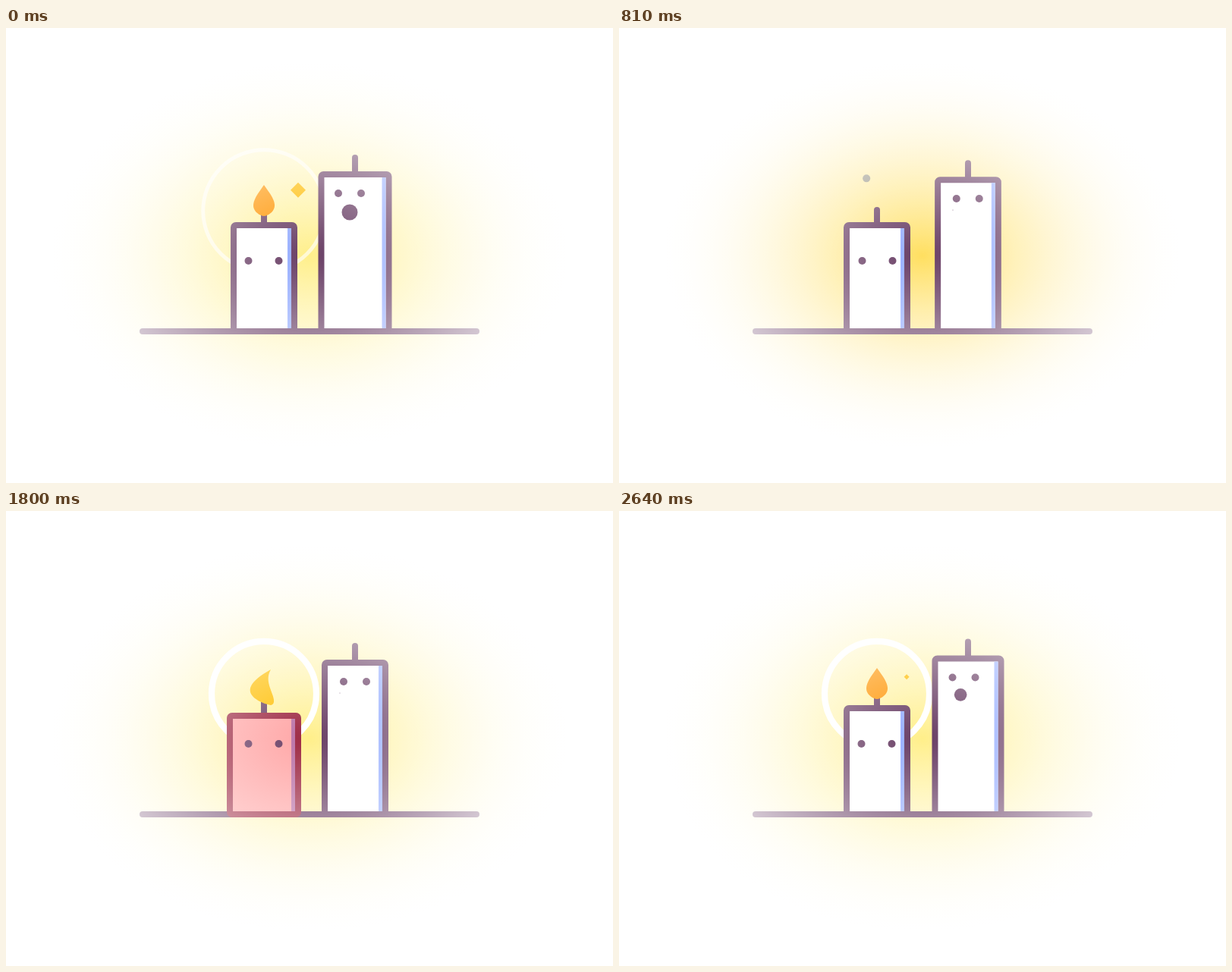
Animation, 800 px wide and 600 px high, one loop 2.67 s. Source, as an HTML page:

```html
<!DOCTYPE html>
<html lang="en">
<head>
<meta charset="utf-8">
<title>Two candles</title>
<style>
html, body { margin: 0; width: 100%; height: 100%; overflow: hidden; background: #fff; }
svg { display: block; width: 100%; height: 100%; }
.ink { fill: #673c63; }
.line { stroke: #673c63; stroke-width: 8; stroke-linecap: round; stroke-linejoin: round; fill: none; }
.wax { fill: #fff; }
.shade { fill: #95adff; }
</style>
</head>
<body>
<svg viewBox="0 0 800 600">
  <defs>
    <radialGradient id="light" r=".7071">
      <stop id="glow"/>
      <stop offset=".6" stop-color="#fff"/>
    </radialGradient>
    <radialGradient id="fade" r=".7071">
      <stop stop-color="#fff" stop-opacity="0"/>
      <stop offset=".65" stop-color="#fff"/>
    </radialGradient>
  </defs>
  <rect width="800" height="600" fill="url(#light)"/>
  <circle id="wave" cx="340" cy="241" fill="none" stroke="#fff"/>

  <line id="tallWick" class="line" x1="460" x2="460"/>
  <rect id="tallBody" class="line wax" rx="3"/>
  <rect id="tallShade" class="shade" width="5"/>
  <g id="tallEyes" class="ink"><circle cx="445" cy="225" r="5"/><circle cx="475" cy="225" r="5"/></g>
  <circle id="mouth" class="ink"/>

  <line id="wick" class="line" x1="0" y1="0" x2="0" y2="-16"/>
  <rect id="body" class="line wax" rx="3"/>
  <rect id="shade" class="shade" width="5"/>
  <path id="flame"/>
  <path id="spark" d="M0-1L1 0L0 1L-1 0Z" fill="#ffbc00"/>
  <circle id="smoke" r="5" fill="#808080" opacity=".8"/>

  <line class="line" x1="180" y1="400" x2="620" y2="400"/>
  <rect id="blush" rx="7" fill="#f00"/>
  <g id="dots" class="ink"><circle cx="320" cy="307" r="5"/><circle cx="360" cy="307" r="5"/></g>
  <rect width="800" height="600" fill="url(#fade)"/>
  <path id="squint" d="M314.5 302l6.5 6.5l-6.5 6.5M362.5 302l-6.5 6.5l6.5 6.5" fill="none" stroke="#ff1420" stroke-width="3.8" stroke-linecap="round"/>
</svg>
<script>
const LOOP = 2670, START = 1000;
const el = {};
document.querySelectorAll('[id]').forEach(n => el[n.id] = n);

const set = (node, attrs) => {
  for (const k in attrs) node.setAttribute(k, attrs[k]);
};
const show = (node, on) => node.setAttribute('visibility', on ? 'visible' : 'hidden');
const ramp = (t, from, to) => Math.min(1, Math.max(0, (t - from) / (to - from)));
const blend = (a, b, p) => `rgb(${a.map((v, i) => Math.round(v + (b[i] - v) * p))})`;

const LIGHT = [255, 239, 138], DARK = [255, 223, 96];
const GOLD = [255, 190, 0], ORANGE = [255, 106, 0];
const INK = [103, 60, 99], RED_INK = [148, 32, 58];

function drawBox(body, shade, cx, w, top) {
  set(body, { x: cx - w / 2 + 4, y: top + 4, width: w - 8, height: 396 - top });
  set(shade, { x: cx + w / 2 - 13, y: top + 8, height: 392 - top });
}

// The tall candle breathes in, holds, blows, then settles
function drawTall(t) {
  const blow = ramp(t, 2937, 3070);
  const puff = ramp(t, 2537, 2670) * (1 - blow);
  const gasp = blow * (1 - ramp(t, 3070, 3490));
  const top = 196 - 7 * puff + 6.5 * gasp;
  drawBox(el.tallBody, el.tallShade, 460, 88 + 9 * puff - 13.5 * gasp, top);
  set(el.tallWick, { y1: top, y2: top - 18 });
  set(el.tallEyes, { transform: `translate(${-7 * puff - 10.5 * gasp} ${-7 * puff})` });
  set(el.mouth, { cx: 440 + 13 * puff, cy: 240 + 3 * puff, r: .5 + 10 * puff + 2.5 * gasp });
}

// The small candle swells with anger until it lights itself again
function drawSmall(t) {
  const rise = ramp(t, 1100, 1560);
  const squash = rise - ramp(t, 1810, 2450);
  const anger = rise - ramp(t, 1820, 1920);
  const bend = ramp(t, 3030, 3080) - ramp(t, 3110, 3204);
  const cx = 340 - 2.5 * Math.sin(2 * Math.PI * ramp(t, 3044, 3257));
  const w = 88 + 10 * squash, top = 256 + 10 * squash;
  const squint = t > 1110 && t < 1640;

  drawBox(el.body, el.shade, cx, w, top);
  set(el.blush, { x: cx - w / 2, y: top, width: w, height: 404 - top, opacity: .35 * anger });
  set(el.wick, { transform: `translate(${cx - 7 * bend} ${top}) rotate(${-31 * bend})` });
  el.wick.style.stroke = blend(INK, RED_INK, squint ? anger : 0);
  show(el.squint, squint);
  show(el.dots, !squint && !(t > 3044 && t < 3124));
  set(el.squint, { transform: `translate(0 ${top - 256})` });
  set(el.dots, { transform: `translate(${cx - 340 + (t > 3124 ? .5 : -.5)} 0)` });
  return top;
}

// A teardrop around a spine that bows left or right
function flamePath(bow) {
  const height = 41 + 6 * Math.abs(bow), steps = 24, left = [], right = [];
  for (let i = 0; i <= steps; i++) {
    const s = (i / steps) ** 1.5;
    const spine = bow * (14 * (2 * s - 1) ** 2 - 5);
    const half = 14 * Math.sin(Math.PI * s ** .65);
    const y = (-s * height).toFixed(2);
    left.push(`${(spine - half).toFixed(2)} ${y}`);
    right.unshift(`${(spine + half).toFixed(2)} ${y}`);
  }
  return `M${left.concat(right).join('L')}Z`;
}

function drawFlame(t, top) {
  const size = ramp(t, 1640, 1700) - ramp(t, 3110, 3205);
  show(el.flame, size > 0);
  const calm = ramp(Math.abs(t - 2655), 15, 150);
  const bow = Math.cos(2 * Math.PI * (t - 1800) / 540) * calm;
  set(el.flame, {
    d: flamePath(bow),
    fill: blend(ORANGE, GOLD, (bow + 1) / 2),
    transform: `translate(340 ${top - 8 - 2 * bow}) scale(${size})`
  });
}

function drawWave(t) {
  const u = (t - 1695) % 420 / 180;
  const on = t > 1695 && t < 2800 && u < 1;
  show(el.wave, on);
  if (!on) return;
  const outer = 88 * (1 - (1 - u) ** 2);
  const width = Math.min(outer, 20 * (1 - u));
  set(el.wave, { r: outer - width / 2, 'stroke-width': width, opacity: Math.min(1, 2.6 * (1 - u)) });
}

function drawBits(t) {
  const fly = ramp(t, 2625, 2830);
  const size = Math.min(45 * fly, 10, 16 * (1 - fly));
  show(el.spark, size > 0);
  set(el.spark, { transform: `translate(${376 + 40 * fly} ${221.5 - 34 * fly}) scale(${size})` });

  const drift = ramp(t, 3204, 3604);
  show(el.smoke, drift > 0 && drift < 1);
  set(el.smoke, { cx: 340 - 20 * drift, cy: 242 - 63 * drift });
}

// One continuous timeline from START, so the inhale runs across the loop point
function draw(ms) {
  const t = (ms - START + LOOP) % LOOP + START;
  const dark = 1 - ramp(t, 1640, 1700) + ramp(t, 3200, 3260);
  set(el.glow, { 'stop-color': blend(LIGHT, DARK, dark) });
  drawWave(t);
  drawTall(t);
  drawFlame(t, drawSmall(t));
  drawBits(t);
}

const origin = performance.now();
function tick() {
  draw((performance.now() - origin) % LOOP);
  requestAnimationFrame(tick);
}
tick();
</script>
</body>
</html>
```
